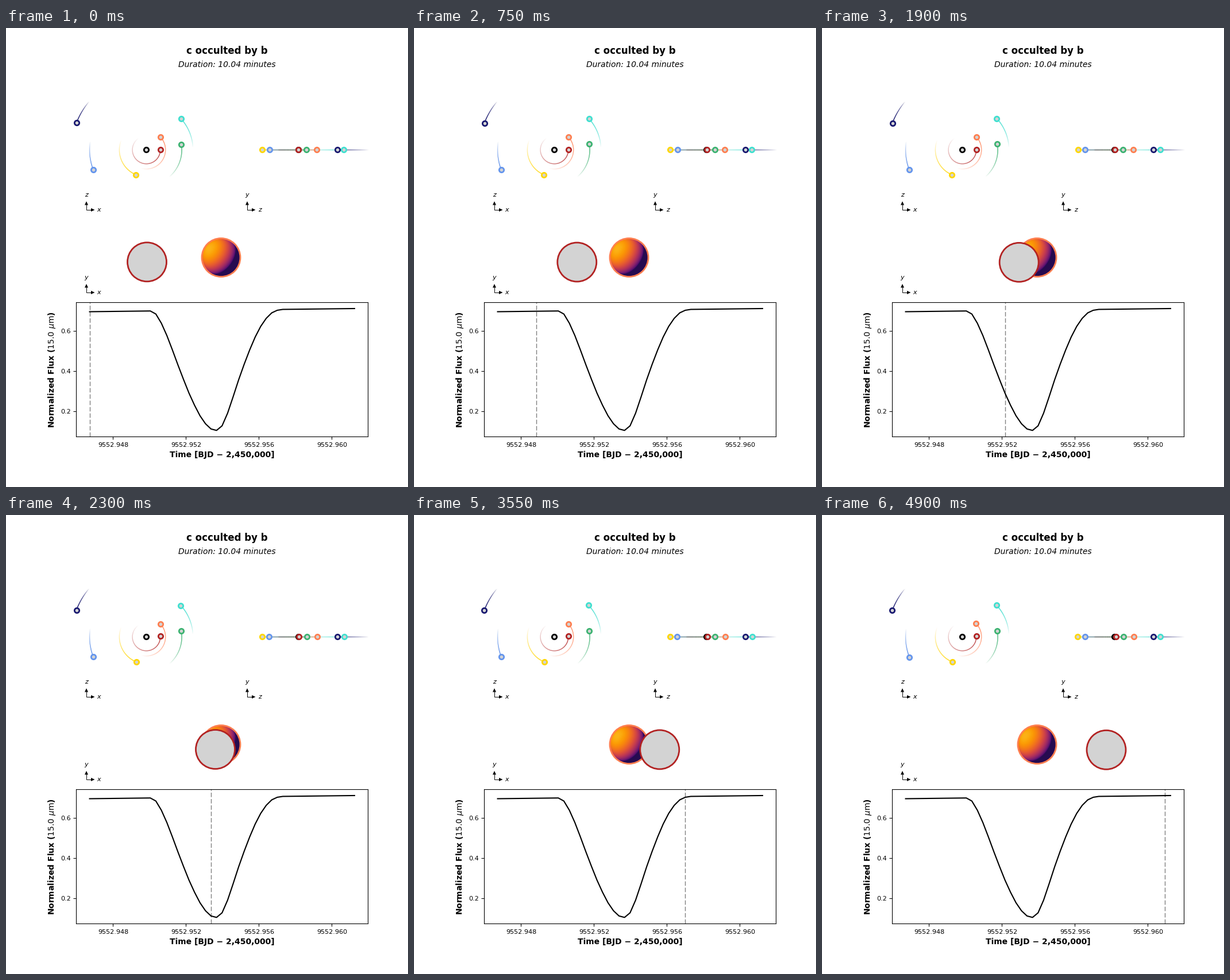
Animation, 700 px wide and 800 px high, one loop 5 s. Source, as a matplotlib script:

```python
import numpy as np
import matplotlib.pyplot as plt
from matplotlib.animation import FuncAnimation
from matplotlib.collections import LineCollection
from matplotlib.colors import to_rgb
from matplotlib.patches import Circle, Polygon

W, H = 700, 800
TICKS, INTERVAL, STEPS = 100, 50, 48
T0, T1 = 9552.946711, 9552.961242
DT = (T1 - T0) / STEPS

# name: (color, semi-major axis [px], period [days], starting angle [deg])
PLANETS = {
    "b": ("firebrick", 24.3, 1.5109, 0.7),
    "c": ("coral", 33.3, 2.4218, 41.8),
    "d": ("gold", 47.0, 4.0496, 247.1),
    "e": ("mediumseagreen", 61.7, 6.0996, 9.2),
    "f": ("turquoise", 81.2, 9.2067, 42.15),
    "g": ("cornflowerblue", 98.8, 12.353, 200.5),
    "h": ("midnightblue", 130.5, 18.767, 158.9),
}
STAR_TOP = np.array([244.4, 212.4])
STAR_SIDE = np.array([509.0, 212.4])
SIDE_SCALE = 1.455
TRAIL = np.linspace(-1, 0, 101)  # days behind the planet

plt.rcParams["text.kerning_factor"] = 6
fig = plt.figure(figsize=(W / 100, H / 100), dpi=100, facecolor="white")
fig.subplots_adjust(left=0.175)

# Light curve: a slow linear rise interrupted by the dip
ax = plt.subplot2grid((5, 2), (3, 0), colspan=2, rowspan=2)
curve_y = np.linspace(494.5, 489, STEPS + 1)
curve_y[12:35] = [498.5, 514.5, 536, 561, 587, 612, 636, 657, 675.5, 689.5,
                  698.5, 701, 693, 671, 642.5, 613, 586, 561, 538.5, 520,
                  506, 496.5, 492]
flux = 0.6 + (528 - curve_y) / 350
ax.plot(T0 + DT * np.arange(STEPS + 1), flux, "k", lw=1.5)
tracker = ax.axvline(T0, color="k", alpha=0.5, lw=1, ls=(0, (5.55, 2.4)))
margin = 0.05 * (T1 - T0)
ax.set_xlim(T0 - margin, T1 + margin)
ax.set_ylim(0.0754, 0.7417)
x_ticks = [9552.948, 9552.952, 9552.956, 9552.960]
ax.set_xticks(x_ticks, [f"{t:.3f}" for t in x_ticks], fontsize=8)
ax.set_yticks([0.2, 0.4, 0.6], ["0.2", "0.4", "0.6"], fontsize=8)
ax.set_xlabel("Time [BJD \u2212 2,450,000]", fontsize=10, fontweight="bold")
ax.set_ylabel(r"Normalized Flux ($15.0\ \mu\mathrm{m}$)", fontsize=10,
              fontweight="bold")

# Everything else lives on a pixel canvas
canvas = fig.add_axes([0, 0, 1, 1])
canvas.axis("off")


def label(x, y, text, **style):
    canvas.text(x, y, text, ha="center", va="center", **style)


def compass(x, y, up, right):
    """Small pair of axis arrows with its corner at (x, y)."""
    canvas.plot([x, x, x + 9], [y - 9, y, y], "k", lw=0.7)
    for tip in ([(x, y - 15), (x - 3, y - 8.5), (x + 3, y - 8.5)],
                [(x + 14.5, y), (x + 8, y - 3), (x + 8, y + 3)]):
        canvas.add_patch(Polygon(tip, fc="k", lw=0))
    label(x, y - 26, up, fontsize=8, style="italic")
    label(x + 22, y, right, fontsize=8, style="italic")


def marker(color, order):
    return canvas.plot([], [], "o", ms=6, mew=2, mfc="lightgrey", mec=color,
                       zorder=order)[0]


def trail(color):
    fade = np.linspace(0, 0.5, len(TRAIL) - 1)
    lines = LineCollection([], colors=[(*to_rgb(color), a) for a in fade],
                           linewidths=1, capstyle="projecting", zorder=2)
    return canvas.add_collection(lines)


def eyeball(cx, cy, r):
    """Sphere shaded in bands of zenith angle around its hot spot."""
    u, v = np.meshgrid(np.linspace(-1, 1, 280), np.linspace(1, -1, 280))
    w = np.sqrt(np.clip(1 - u**2 - v**2, 0, None))
    cos_zenith = np.clip(-0.62 * u + 0.45 * v + 0.64 * w, 0, 1)
    band = np.radians(3)
    zenith = np.ceil(np.arccos(cos_zenith) / band) * band
    shade = 0.14 + 0.69 * np.clip(np.cos(zenith), 0, 1) ** 0.65
    img = canvas.imshow(shade, cmap="inferno", vmin=0, vmax=1, aspect="auto",
                        extent=(cx - r, cx + r, cy + r, cy - r), zorder=3)
    img.set_clip_path(Circle((cx, cy), r, transform=canvas.transData))
    canvas.add_patch(Circle((cx, cy), r, fc="none", ec="coral", lw=2, zorder=4))


label(385, 40, "c occulted by b", fontsize=12, fontweight="bold")
label(385, 64, "Duration: 10.04 minutes", fontsize=10, style="italic")
compass(140, 317, "z", "x")
compass(420, 317, "y", "z")
compass(140, 461, "y", "x")

eyeball(374.5, 400, 33.5)
occultor = canvas.add_patch(Circle((0, 0), 34, fc="lightgrey", ec="firebrick",
                                   lw=2, zorder=5))

for star in (STAR_TOP, STAR_SIDE):
    marker("k", 9).set_data([star[0]], [star[1]])
bodies = [(orbit, marker(orbit[0], 10), trail(orbit[0]),
           marker(orbit[0], 10), trail(orbit[0]))
          for orbit in PLANETS.values()]

canvas.set_xlim(0, W)
canvas.set_ylim(H, 0)


def place(path, dot, line):
    dot.set_data(path[-1:, 0], path[-1:, 1])
    line.set_segments(np.stack([path[:-1], path[1:]], axis=1))


def update(tick):
    step = tick * STEPS // TICKS
    tracker.set_xdata([T0 + step * DT] * 2)
    occultor.center = (245.5 + 5.4975 * step - 0.00402 * step**2,
                       407.8 + 0.032 * step)
    for (_, radius, period, start), top, top_trail, side, side_trail in bodies:
        angle = np.radians(start + 360 * (step * DT + TRAIL) / period)
        x, z = radius * np.cos(angle), radius * np.sin(angle)
        place(STAR_TOP + np.column_stack([x, -z]), top, top_trail)
        place(STAR_SIDE + np.column_stack([SIDE_SCALE * z, 0 * z]),
              side, side_trail)
    return []


anim = FuncAnimation(fig, update, frames=TICKS, interval=INTERVAL, repeat=True)
plt.show()
```
